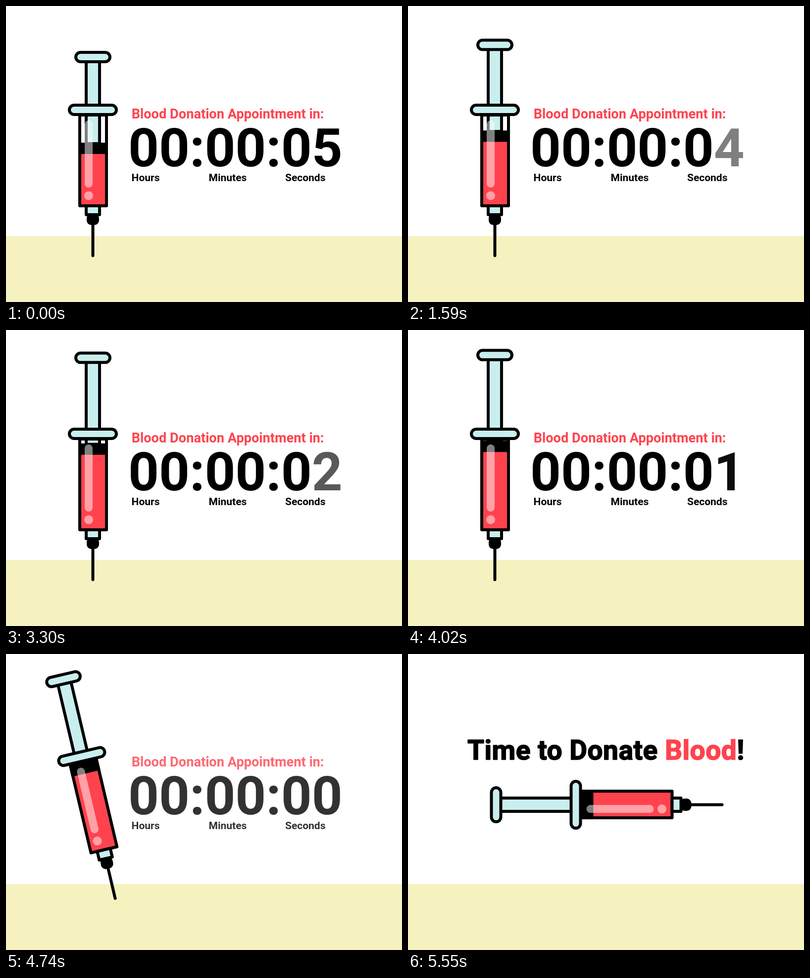
Animation, 800 px wide and 600 px high, one loop 7200 ms. Source, as an HTML page:

```html
<!DOCTYPE html>
<html lang="en">
<head>
<meta charset="utf-8">
<title>Blood donation countdown</title>
<style>
  html, body { margin: 0; width: 100%; height: 100%; overflow: hidden; background: #fff; }
  svg { display: block; width: 100%; height: 100%; }
  text { font-family: Roboto, Arial, sans-serif; font-weight: 700; white-space: pre; }
  .red { fill: #ff434e; }
  .glass { fill: #c9eeee; }
  .line { stroke: #000; stroke-width: 6; stroke-linejoin: round; stroke-linecap: round; }
  .shine { fill: #fff; fill-opacity: .5; }
  #title { letter-spacing: .5px; stroke: #000; stroke-width: 1.6; stroke-linejoin: round; }
  #title .red { stroke: #ff434e; }
</style>
</head>
<body>
<svg viewBox="0 0 800 600">
  <rect width="800" height="600" fill="#fff"/>
  <rect y="466.3" width="800" height="134" fill="#f5f2c0"/>

  <g id="countdown">
    <text class="red" x="253.7" y="228" font-size="27.2">Blood Donation Appointment in:</text>
    <text x="247" y="325" font-size="108">00:00:0<tspan id="digit">5</tspan></text>
    <g font-size="21">
      <text x="253.6" y="355">Hours</text>
      <text x="409.6" y="355">Minutes</text>
      <text x="564" y="355">Seconds</text>
    </g>
  </g>

  <text id="title" x="120" y="213.6" font-size="55">Time to Donate <tspan class="red">Blood</tspan>!</text>

  <g id="syringe">
    <rect x="149" y="221" width="54" height="184" fill="#fff"/>
    <rect id="blood" class="red" x="149" width="54"/>
    <g id="plunger">
      <rect class="glass line" x="162" y="103" width="27" height="176"/>
      <rect class="glass line" x="141" y="94" width="69" height="19" rx="9.5"/>
      <rect x="146" y="277" width="60" height="23"/>
    </g>
    <rect class="line" x="149" y="221" width="54" height="184" fill="none"/>
    <rect class="glass line" x="162" y="405" width="27" height="18"/>
    <rect x="163" y="421" width="25" height="23" rx="9.5"/>
    <path class="line" d="M175.5 440V506"/>
    <rect class="shine" x="159" y="232" width="16" height="136" rx="8"/>
    <circle class="shine" cx="167" cy="384.5" r="9"/>
    <rect class="glass line" x="128" y="201" width="95" height="19" rx="9.5"/>
  </g>
</svg>
<script>
const LOOP = 7200, STEP = 30, SECOND = 900;
const PIVOT = { x: 175.5, y: 311 };
const $ = id => document.getElementById(id);
const [countdown, digit, title, syringe, blood, plunger] =
  ['countdown', 'digit', 'title', 'syringe', 'blood', 'plunger'].map($);

const progress = (t, start, end) => Math.min(1, Math.max(0, (t - start) / (end - start)));
const smooth = u => u * u * (3 - 2 * u);

function bezier(x1, y1, x2, y2) {
  const curve = (a, b, s) => 3 * a * s * (1 - s) ** 2 + 3 * b * s * s * (1 - s) + s ** 3;
  return u => {
    let low = 0, high = 1;
    for (let i = 0; i < 24; i++) {
      const mid = (low + high) / 2;
      if (curve(x1, x2, mid) < u) low = mid; else high = mid;
    }
    return curve(y1, y2, (low + high) / 2);
  };
}
const drawEase = bezier(.167, .167, .667, 1);
const slideEase = bezier(.35, 0, .2, 1);

function render(t) {
  // The plunger draws blood throughout the countdown.
  const lift = 54 * drawEase(progress(t, 0, 4500));
  plunger.setAttribute('transform', `translate(0 ${-lift})`);
  blood.setAttribute('y', 299 - lift);
  blood.setAttribute('height', 106 + lift);

  // Each digit fades out late in its second and is cut to the next.
  const count = Math.max(0, 5 - Math.floor(t / SECOND));
  digit.textContent = count;
  digit.setAttribute('fill-opacity', count ? 1 - progress(t % SECOND, 390, 990) : 1);
  countdown.setAttribute('opacity', 1 - progress(t, 4680, 4980));
  title.setAttribute('opacity', progress(t, 4896, 5500));

  // Dip, rise, then tip over while sliding to the centre.
  const x = PIVOT.x + 264 * slideEase(progress(t, 4720, 5550));
  const y = PIVOT.y + 27 * smooth(progress(t, 4200, 4500)) - 32.4 * smooth(progress(t, 4500, 4740));
  const angle = -90 * smooth(progress(t, 4624, 5104));
  syringe.setAttribute('transform',
    `translate(${x} ${y}) rotate(${angle}) translate(${-PIVOT.x} ${-PIVOT.y})`);
}

function tick() {
  const t = performance.now() % LOOP;
  render(Math.floor(t / STEP) * STEP);
  requestAnimationFrame(tick);
}
tick();
</script>
</body>
</html>
```
